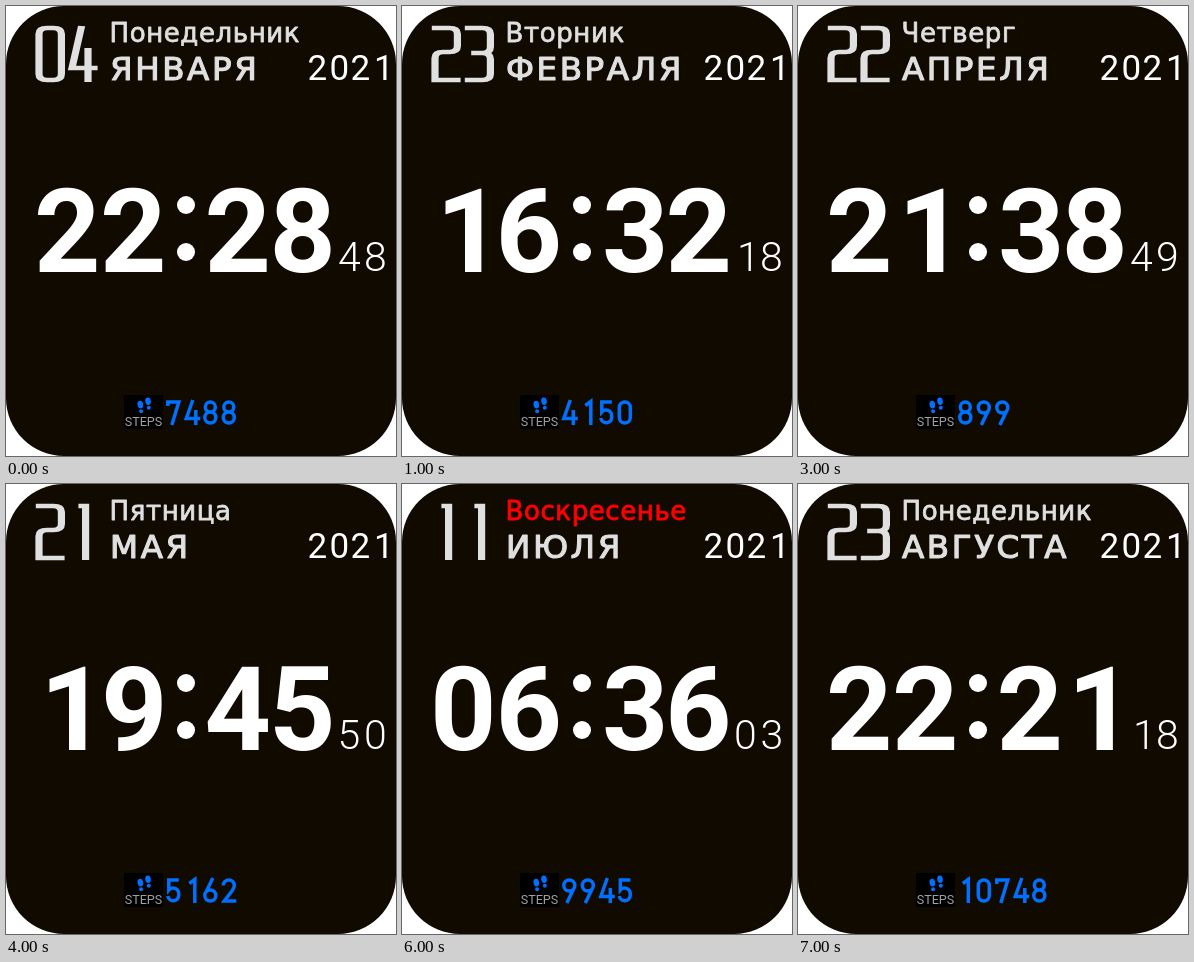
These frames come from a looping animation (390 by 450 pixels, 8 s). An HTML page with a canvas:

```html
<!DOCTYPE html>
<html lang="ru">
<head>
<meta charset="utf-8">
<style>
html, body { margin: 0; width: 100%; height: 100%; overflow: hidden; background: #fff; }
canvas { display: block; }
</style>
</head>
<body>
<canvas id="face" width="390" height="450"></canvas>
<script>
const ctx = document.getElementById('face').getContext('2d');
const BLUE = '#0070ff', GREY = '#e0e0e0', RED = '#ff0000';

// date, weekday, month, time, seconds, steps; one screen per second
const screens = [
  ['04', 'Понедельник', 'ЯНВАРЯ', '2228', '48', '7488'],
  ['23', 'Вторник', 'ФЕВРАЛЯ', '1632', '18', '4150'],
  ['10', 'Среда', 'МАРТА', '0854', '36', '6327'],
  ['22', 'Четверг', 'АПРЕЛЯ', '2138', '49', '899'],
  ['21', 'Пятница', 'МАЯ', '1945', '50', '5162'],
  ['05', 'Суббота', 'ИЮНЯ', '2107', '21', '7086'],
  ['11', 'Воскресенье', 'ИЮЛЯ', '0636', '03', '9945'],
  ['23', 'Понедельник', 'АВГУСТА', '2221', '18', '10748']
];

// Stroked digits: squared ones for the date, narrow ones for the steps
const dateDigits = {
  0: 'M0 6q0-6 5-6h4q5 0 5 6v40q0 6-5 6h-4q-5 0-5-6z',
  1: 'M4 0H8.5V54',
  2: 'M-2 0H9q5 0 5 6v12q0 6-5 6H5q-5 0-5 6V52H16',
  3: 'M-2 0H9q5 0 5 6v13q0 6-5 6H2M9 25q5 0 5 6v15q0 6-5 6H-2',
  4: 'M6-2L0 40H16M10 20V54',
  5: 'M15 0H0V22H9q5 0 5 6v18q0 6-5 6H-2'
};
const stepDigits = {
  0: 'M0 5.5a5.5 5.5 0 0 1 11 0v10a5.5 5.5 0 0 1-11 0z',
  1: 'M3 3.5L8.5-.5V23',
  2: 'M0 5.5a5.5 5.5 0 0 1 11 0c0 2-1 3.5-2 5L1 21H13',
  3: 'M.3 4.5C1.5-1.5 11-1.5 11 5C11 8.5 8.5 10 5 10c4 0 6 2 6 5.5c0 7-10 7-11 0',
  4: 'M6.5-2L0 16.5H14M9.5 8V23',
  5: 'M11 0H1V10C4 6.5 11 7.5 11 14.5C11 22.5 1 22.5 0 16',
  6: 'M8-2L1 12.5M0 15.5a5.5 5.5 0 1 1 11 0a5.5 5.5 0 1 1-11 0',
  7: 'M0 4V0H11L4 23',
  8: 'M.5 5a5 5 0 1 1 10 0a5 5 0 1 1-10 0M0 15.5a5.5 5.5 0 1 1 11 0a5.5 5.5 0 1 1-11 0',
  9: 'M3 23L10 8.5M0 5.5a5.5 5.5 0 1 1 11 0a5.5 5.5 0 1 1-11 0'
};

function strokeDigits(text, paths, x, y, advance, stretch, width, color) {
  ctx.strokeStyle = color;
  ctx.lineWidth = width;
  [...text].forEach((d, i) => {
    ctx.save();
    ctx.translate(x + i * advance, y);
    ctx.scale(stretch, 1);
    ctx.stroke(new Path2D(paths[d]));
    ctx.restore();
  });
}

// Centres the ink of each digit on its own x
function cells(text, font, y, centres) {
  ctx.font = font;
  ctx.fillStyle = '#fff';
  [...text].forEach((d, i) => {
    const m = ctx.measureText(d);
    const ink = (m.actualBoundingBoxRight - m.actualBoundingBoxLeft) / 2;
    ctx.fillText(d, centres[i] - ink, y);
  });
}

function label(text, x, y, size, spacing, weight, color) {
  ctx.font = `${size}px "DejaVu Sans", sans-serif`;
  ctx.letterSpacing = spacing + 'px';
  ctx.fillStyle = ctx.strokeStyle = color;
  ctx.lineWidth = weight;
  ctx.lineJoin = 'round';
  ctx.fillText(text, x, y);
  ctx.strokeText(text, x, y);
  ctx.letterSpacing = '0px';
  ctx.lineJoin = 'miter';
}

function oval(x, y, rx, ry, color, tilt = 0) {
  ctx.fillStyle = color;
  ctx.beginPath();
  ctx.ellipse(x, y, rx, ry, tilt, 0, 2 * Math.PI);
  ctx.fill();
}

function footprint(x, y) {
  oval(x, y, 2.8, 3.8, BLUE, -0.15);
  oval(x + 0.8, y + 6.6, 2, 2, BLUE);
}

function stepsIcon() {
  ctx.fillStyle = '#000';
  ctx.fillRect(118, 389, 39, 34);
  footprint(134.3, 398.6);
  footprint(142, 395.2);
  ctx.font = '12.6px Roboto, sans-serif';
  ctx.fillStyle = '#a0a0a0';
  ctx.textAlign = 'center';
  ctx.fillText('STEPS', 137.5, 420);
  ctx.textAlign = 'left';
}

function draw([date, day, month, time, seconds, steps]) {
  ctx.fillStyle = '#fff';
  ctx.fillRect(0, 0, 390, 450);
  ctx.fillStyle = '#100a00';
  ctx.beginPath();
  ctx.roundRect(0, 0, 390, 450, 58);
  ctx.fill();

  strokeDigits(date, dateDigits, 33, 22, 33, 1.6, 4.5, GREY);
  const weekend = day === 'Суббота' || day === 'Воскресенье';
  label(day, 103.5, 36, 26, 0.6, 0.8, weekend ? RED : GREY);
  label(month, 104, 74, 32.5, 2.6, 1.2, GREY);
  cells('2021', '35px Roboto, sans-serif', 74, [311.5, 333, 354.5, 375.5]);

  cells(time, 'bold 116px Roboto, sans-serif', 265.5, [61.5, 127.5, 232, 297]);
  oval(180, 199, 9, 9, '#fff');
  oval(180, 246, 9, 9, '#fff');
  cells(seconds, '300 41px Roboto, sans-serif', 265, [343.5, 369.5]);

  stepsIcon();
  strokeDigits(steps, stepDigits, 161.8, 396, 18.5, 1, 3.5, BLUE);
}

function tick() {
  draw(screens[Math.floor(performance.now() / 1000) % screens.length]);
  requestAnimationFrame(tick);
}
tick();
</script>
</body>
</html>
```
